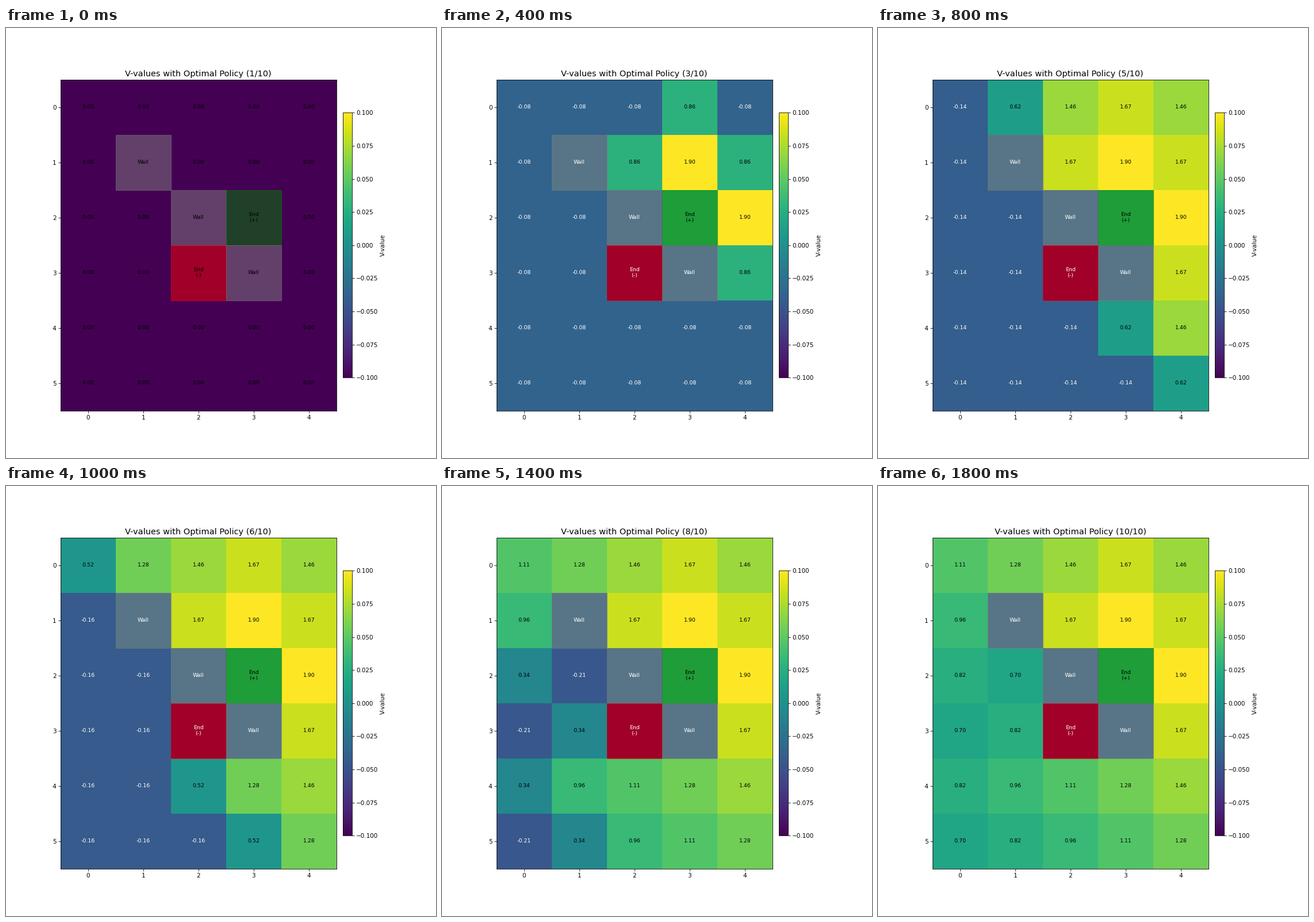
Write a matplotlib script that moves like this. It is 748 px wide and 748 px high and loops after 2000 ms.

```python
import numpy as np
import matplotlib.pyplot as plt
from matplotlib.animation import FuncAnimation
from matplotlib.cm import ScalarMappable
from matplotlib.colors import Normalize
from matplotlib.patches import Rectangle

plt.rcParams["font.family"] = "DejaVu Sans"

ROWS, COLS, STEPS = 6, 5, 10
GAMMA, STEP_COST = 0.9, -0.04
WALLS = {(1, 1), (2, 2), (3, 3)}
ENDS = {(2, 3): 1.0, (3, 2): -1.0}
MOVES = [(-1, 0), (1, 0), (0, -1), (0, 1)]
CELLS = [(r, c) for r in range(ROWS) for c in range(COLS)]


def move_value(values, cell, move):
    target = cell[0] + move[0], cell[1] + move[1]
    if target not in CELLS or target in WALLS:
        target = cell
    return ENDS.get(target, STEP_COST) + GAMMA * values[target]


def iterate(values):
    new = np.zeros_like(values)
    for cell in CELLS:
        if cell in ENDS:
            new[cell] = ENDS[cell]
        elif cell not in WALLS:
            new[cell] = max(move_value(values, cell, m) for m in MOVES)
    return new


history = [np.zeros((ROWS, COLS))]
while len(history) < STEPS:
    history.append(iterate(history[-1]))

fig, ax = plt.subplots(figsize=(10, 10), dpi=74.8)
image = ax.imshow(history[0], cmap="viridis")
scale = ScalarMappable(Normalize(-0.1, 0.1), "viridis")
fig.colorbar(scale, ax=ax, label="V-value", shrink=0.8, aspect=30, pad=0.02)
title = ax.set_title("", fontsize=14)
ax.set_xticks(range(COLS))
ax.set_yticks(range(ROWS))


def shade(cell, color):
    r, c = cell
    ax.add_patch(Rectangle((c - 0.5, r - 0.5), 1, 1, color=color, alpha=0.5))


labels = {}
for cell in CELLS:
    text = ""
    if cell in WALLS:
        shade(cell, "gray")
        text = "Wall"
    elif cell in ENDS:
        good = ENDS[cell] > 0
        shade(cell, "green" if good else "red")
        text = "End\n(+)" if good else "End\n(-)"
    labels[cell] = ax.text(cell[1], cell[0], text, ha="center", va="center",
                           fontsize=9)


def update(i):
    values = history[i]
    image.set_data(values)
    image.set_clim(values.min(), values.max())
    title.set_text(f"V-values with Optimal Policy ({i + 1}/{STEPS})")
    for cell, label in labels.items():
        value = values[cell]
        label.set_color("white" if value < 0.1 * values.max() else "black")
        if cell not in WALLS and cell not in ENDS:
            label.set_text(f"{value:.2f}")
    return [image, title, *labels.values()]


anim = FuncAnimation(fig, update, frames=STEPS, interval=200, repeat=True)
plt.show()
```
